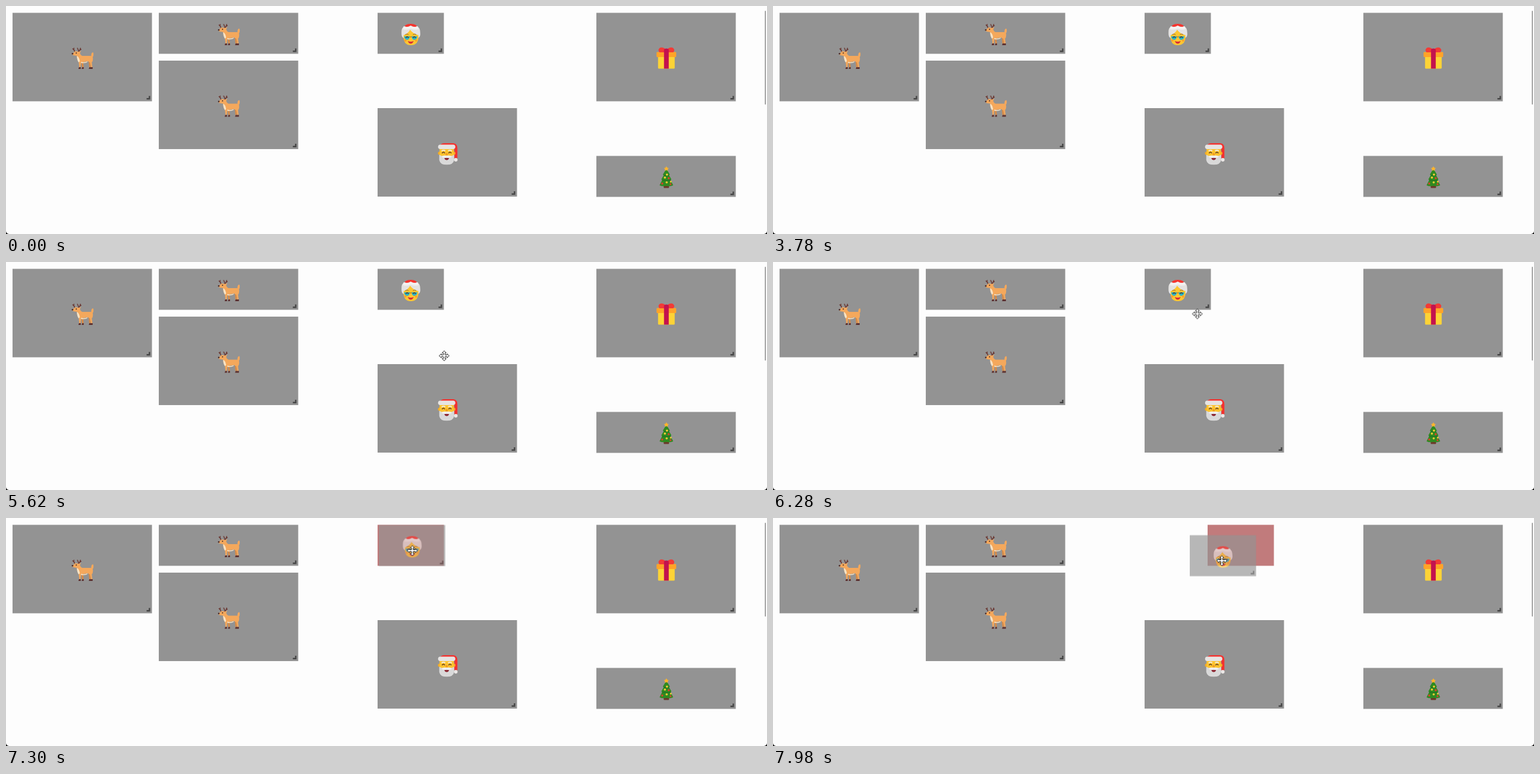
Write an HTML page that moves like this. It is 1280x384 px and loops after 8000 ms.

```html
<!DOCTYPE html>
<html lang="en">
<head>
<meta charset="utf-8">
<title>Festive grid</title>
<style>
html, body { margin: 0; width: 100%; height: 100%; overflow: hidden; background: #000; }
svg { display: block; }
.stage { width: 1280px; height: 384px; }
.panel { fill: #939393; }
.grip { fill: #454545; }
.ghost, .dragged, .cursor { animation: 8s linear infinite; }
.ghost { animation-name: ghost; }
.dragged { animation-name: drag; }
.cursor { animation-name: point; }

@keyframes ghost {
  0%, 89.24% { opacity: 0; transform: none; }
  89.25%, 97.5% { opacity: 1; transform: none; animation-timing-function: ease-out; }
  98.25% { opacity: 1; transform: translate(102px, 0); }
  99.75%, 100% { opacity: 1; transform: translate(106px, 0); }
}
@keyframes drag {
  0%, 89.24% { opacity: 1; transform: none; }
  89.25%, 90.5% { opacity: .66; transform: none; animation-timing-function: ease-in; }
  93.5% { opacity: .66; transform: translate(24px, 4px); }
  96% { opacity: .66; transform: translate(55px, 11.5px); animation-timing-function: ease-out; }
  98.25%, 99.25% { opacity: .66; transform: translate(68px, 15px); }
  99.75%, 100% { opacity: .66; transform: translate(76px, 17.5px); }
}
@keyframes point {
  0%, 68.24% { opacity: 0; transform: translate(800px, 384px); }
  68.25% { opacity: 1; transform: translate(800px, 384px); animation-timing-function: ease-out; }
  70.25%, 71.4% { transform: translate(737px, 158px); animation-timing-function: ease-out; }
  77.25%, 78.25% { transform: translate(717px, 93px); }
  80.25% { transform: translate(692px, 50px); animation-timing-function: ease-out; }
  82% { transform: translate(670px, 34px); animation-timing-function: ease-in-out; }
  84.25%, 85.5% { transform: translate(677px, 56px); }
  87.75%, 90.25% { transform: translate(679px, 54px); animation-timing-function: ease-in; }
  93.25% { transform: translate(707px, 60px); }
  96% { transform: translate(740px, 68px); animation-timing-function: ease-out; }
  98.25%, 99.25% { transform: translate(748px, 70px); }
  99.75%, 100% { opacity: 1; transform: translate(755px, 72px); }
}
</style>
</head>
<body>
<svg class="stage" viewBox="0 0 1280 384">
  <defs>
    <path id="grip" class="grip" d="M6 6H0V3.6H3.6V0H6Z"/>

    <symbol id="deer" viewBox="0 0 38 38">
      <g fill="none" stroke="#6b3a35" stroke-width="1.5" stroke-linecap="round">
        <path d="M8 9Q4 6 5 2M6 6L3 3M11 9Q15 7 16 2M13 7L11 2M15 5L17 4"/>
      </g>
      <g stroke="#d98b45" stroke-width="2.8">
        <path d="M19 25L20 34M31 23L32 34"/>
      </g>
      <path fill="#f4a85c" d="M34 15Q34 9 37 9Q40 12 36 18Z"/>
      <path fill="#f4a85c" d="M2 11L7 8L6 7L13 8L17 7L15 10Q16 14 19 15H33Q37 15 37 20Q37 24 35 26L36 34H34L32 26L28 24L17 26L16 34H14L13 25Q10 21 10 15L4 14Q2 13 2 11Z"/>
      <path fill="#f8e3c4" d="M10 15Q14 17 15 24L13 26Q10 22 10 15ZM17 25Q23 27 28 24L27 26Q22 28 17 27Z"/>
      <path fill="#5d302e" d="M13.5 34H16.5V37H12.5ZM19 34H21.5V37H18ZM31 34H33.5V37H30ZM34 34H36.5V37H33Z"/>
      <circle cx="2.7" cy="11.3" r="1.4" fill="#4a2c2c"/>
      <circle cx="9" cy="10.3" r="1" fill="#3c2929"/>
    </symbol>

    <symbol id="lady" viewBox="0 0 38 38">
      <path fill="#f5352f" d="M7 9Q8 1 19 1Q30 1 31 9Z"/>
      <path fill="#e4e2e1" d="M3.5 16Q3 7 9 5Q14 8 19 5Q25 8 29 5Q35 7 35 16Q36 23 31 25H7Q3 23 3.5 16Z"/>
      <path fill="#fdc632" d="M7 20Q14 18 18 11Q23 18 32 20Q33 37 19 37Q6 37 7 20Z"/>
      <path fill="#f3f1f0" d="M7 5Q12 8 19 4Q26 8 31 5L32 10Q25 12 19 9Q13 12 6 10Z"/>
      <path fill="#26b5c7" d="M8 22H17.5Q17 28 12.5 28Q8 27 8 22ZM20.5 22H30Q30 27 25.5 28Q21 28 20.5 22Z"/>
      <g fill="none" stroke-linecap="round">
        <path stroke="#986424" d="M10 19Q13 17 15 19M23 19Q26 17 28 19M17.5 23H20.5"/>
        <path stroke="#513329" stroke-width="1.5" d="M11 24Q13 21.5 15 24M23 24Q25 21.5 27 24"/>
      </g>
      <path fill="#d92d37" d="M14 30Q19 32 24 30Q22 34.5 19 34.5Q16 34.5 14 30Z"/>
      <circle cx="10" cy="29" r="2" fill="#ffa22c"/>
      <circle cx="28" cy="29" r="2" fill="#ffa22c"/>
    </symbol>

    <symbol id="santa" viewBox="0 0 38 38">
      <path fill="#f3322f" d="M6 7Q7 1.5 15 1.5H29Q36 2 36 10V27H31V12L27 9Z"/>
      <circle cx="6" cy="18.5" r="2.7" fill="#f6ac24"/>
      <circle cx="30" cy="18.5" r="2.7" fill="#f6ac24"/>
      <path fill="#fdc32f" d="M6 10H30V25H6Z"/>
      <path fill="#d9d9d9" d="M5.5 21Q11 25 18 22Q25 25 30.5 21V30Q29 38 18 38Q7 38 5.5 30Z"/>
      <path fill="#f2f0ef" d="M9 24Q14 21 18 23Q22 21 27 24Q23 28 18 25Q13 28 9 24Z"/>
      <path fill="#8d2632" d="M14 26.5H22Q21 30 18 30Q15 30 14 26.5Z"/>
      <path fill="none" stroke="#5b3a25" stroke-width="1.6" stroke-linecap="round" d="M10.5 18Q12.5 15.5 14.5 18M21.5 18Q23.5 15.5 25.5 18"/>
      <path fill="none" stroke="#eee" stroke-width="1.8" stroke-linecap="round" d="M10 14.2Q12.5 12.5 15 14M21 14Q23.5 12.5 26 14.2"/>
      <circle cx="18" cy="20" r="2" fill="#f49b20"/>
      <rect x="3.5" y="4" width="29" height="7.5" rx="3.7" fill="#e6e4e3"/>
      <circle cx="33.3" cy="29.5" r="3" fill="#eae7e6"/>
    </symbol>

    <symbol id="gift" viewBox="0 0 38 38">
      <path fill="#fdd336" d="M5.5 16H33.5V35Q33.5 36.5 32 36.5H7Q5.5 36.5 5.5 35Z"/>
      <rect x="3" y="8.5" width="33" height="8.5" rx="1.2" fill="#ffa328"/>
      <path fill="#f23b36" d="M15 9H8Q5 6 7 3Q9 0 13 1Q18 2 19.5 6Q21 2 26 1Q30 0 32 3Q34 6 31 9Z"/>
      <path fill="#c3124e" d="M15.5 4Q19.5 1 23.5 4V36.5H15.5Z"/>
    </symbol>

    <symbol id="tree" viewBox="0 0 38 38">
      <rect x="15" y="31" width="9" height="5.5" rx="1" fill="#6d3829"/>
      <path fill="#2f8a20" d="M19.5 4L25.5 14L24 15L28 22L26.5 23L31 32Q25 34.5 19.5 33Q13 34.5 8 32L12.5 23L11 22L15 15L13.5 14Z"/>
      <path fill="none" stroke="#1d6d22" d="M15 15Q20 17 24 15M12 23Q20 26 27 23"/>
      <path fill="#fdb52c" d="M19.5 0L21 2.5L23.5 3L21.8 5L22 7.5L19.5 6.5L17 7.5L17.2 5L15.5 3L18 2.5Z"/>
      <g fill="#fbce37">
        <circle cx="20.5" cy="14" r="1.8"/><circle cx="17" cy="19" r="1.8"/>
        <circle cx="20" cy="27" r="1.8"/><circle cx="27" cy="26" r="1.4"/>
      </g>
      <g fill="#e23c2e">
        <circle cx="23.5" cy="20" r="1.7"/><circle cx="12.5" cy="29" r="1.7"/><circle cx="26.5" cy="30" r="1.6"/>
      </g>
    </symbol>
  </defs>

  <rect y="-12" width="1280" height="396" rx="5" fill="#fdfdfd"/>
  <rect x="1276.5" y="8" width="1.5" height="158" rx=".75" fill="#858585"/>
  <g id="cards"></g>
  <rect class="ghost" x="625" y="11.5" width="111.5" height="69" fill="#c17b7c"/>
  <g id="top" class="dragged"></g>
  <g class="cursor">
    <path fill="#fff" stroke="#222" stroke-width="1" stroke-linejoin="round"
      d="M0-8.5L3.4-4.8H1.4V-1.4H4.8V-3.4L8.5 0L4.8 3.4V1.4H1.4V4.8H3.4L0 8.5L-3.4 4.8H-1.4V1.4H-4.8V3.4L-8.5 0L-4.8-3.4V-1.4H-1.4V-4.8H-3.4Z"/>
  </g>
</svg>
<script>
const WIDE = 234.5, TALL = 149, SHORT = 69;

function card(x, y, w, h, icon) {
  return `<g transform="translate(${x} ${y})">
    <rect class="panel" width="${w}" height="${h}"/>
    <use href="#${icon}" x="${w / 2 - 19}" y="${h / 2 - 17}" width="38" height="38"/>
    <use href="#grip" x="${w - 9}" y="${h - 9}"/>
  </g>`;
}

document.getElementById('cards').innerHTML = [
  [11, 11.5, WIDE, TALL, 'deer'],
  [257, 11.5, WIDE, SHORT, 'deer'],
  [257, 92, WIDE, TALL, 'deer'],
  [625, 172, WIDE, TALL, 'santa'],
  [993, 11.5, WIDE, TALL, 'gift'],
  [993, 252.5, WIDE, SHORT, 'tree']
].map(c => card(...c)).join('');

document.getElementById('top').innerHTML = card(625, 11.5, 111.5, SHORT, 'lady');
</script>
</body>
</html>
```
